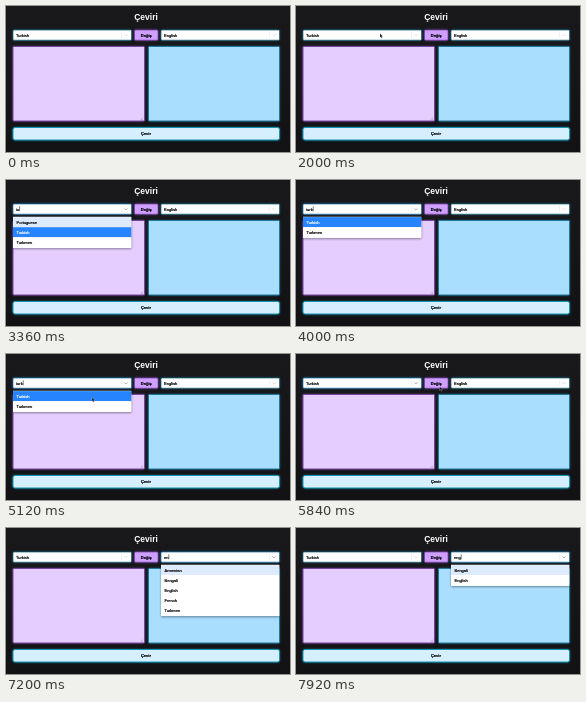
Write an HTML page that moves like this. It is 284 px wide and 146 px high and loops after 8 s.

```html
<!DOCTYPE html>
<html lang="tr">
<head>
<meta charset="utf-8">
<title>Çeviri</title>
<style>
  html, body { margin: 0; width: 100%; height: 100%; overflow: hidden; background: #17171a; }
  svg { display: block; }
  body > svg { width: 100vw; height: 100vh; }
  text { font: 4px "Liberation Sans", Arial, sans-serif; fill: #000; stroke: #000; stroke-width: .2; }
  .light { fill: #fff; stroke: #fff; }
  .bold { font-weight: 700; text-anchor: middle; }
  .title { font-size: 8.5px; stroke: none; }
</style>
</head>
<body>
<svg viewBox="0 0 284 146">
  <defs>
    <linearGradient id="page" x2="0" y2="1">
      <stop stop-color="#19191c"/><stop offset="1" stop-color="#121215"/>
    </linearGradient>
    <filter id="glow" x="-20%" y="-50%" width="140%" height="200%"><feGaussianBlur stdDeviation="1"/></filter>
  </defs>
  <rect width="284" height="146" fill="url(#page)"/>
  <text class="bold light title" x="140" y="14">Çeviri</text>
  <g id="panels"></g>
  <text class="bold" x="140.3" y="30.7">Değiş</text>
  <text class="bold" x="140" y="129.2">Çevir</text>
  <path d="M134.5 114l2.5-2.5M136 114l1-1" stroke="#8874a0" stroke-width=".4"/>
  <g id="live"></g>
</svg>
<script>
const LOOP = 8000;
const BLINK = 540;
const ROW = 10.1;
const WIDTH = 118.5;
const LANGUAGES = ('Afrikaans Albanian Amharic Arabic Armenian Azerbaijani Basque Belarusian Bengali ' +
  'Bosnian Bulgarian Catalan Cebuano Croatian Czech Danish Dutch English Esperanto Estonian ' +
  'Finnish French Galician Georgian German Greek Gujarati Hindi Italian Japanese Latin ' +
  'Lithuanian Portuguese Russian Turkish Turkmen Vietnamese').split(' ');

const selects = [
  { x: 7, value: 'Turkish', selected: 'Turkish', focus: [2080, 6080], open: [2160, 5360],
    keys: [[2960, 't'], [3280, 'tu'], [3520, 'tur'], [3680, 'turk']] },
  { x: 155, value: 'English', selected: '', focus: [6080, LOOP], open: [6140, LOOP],
    keys: [[6640, 'e'], [6960, 'en'], [7440, 'eng']] },
];

// Pointer stops: time, x, y
const pointerPath = [
  [320, 141, 123], [640, 151, 62], [800, 140, 18], [1040, 84, 28], [1440, 84, 28], [1520, 84, 27.5],
  [2160, 84, 27.5], [2400, 82.5, 28], [4480, 82.5, 28], [4960, 86, 43.5],
  [5600, 86, 43.5], [6000, 174.5, 26.5], [LOOP, 174.5, 26.5],
];
const pointerShown = [[320, 2960], [4480, 6640]];

const within = (t, [from, to]) => t >= from && t < to;
const ease = p => p * p * (3 - 2 * p);

const rect = (x, y, w, h, fill, extra = '') =>
  `<rect x="${x}" y="${y}" width="${w}" height="${h}" fill="${fill}" ${extra}/>`;
const label = (x, y, text, style = '') => `<text x="${x}" y="${y}" class="${style}">${text}</text>`;

function panel(x, y, w, h, fill, border, { radius = 1, line = 1 } = {}) {
  return rect(x, y, w, h, border, `rx="${radius}" stroke="${border}" filter="url(#glow)" opacity=".6"`) +
    rect(x, y, w, h, fill, `rx="${radius}" stroke="${border}" stroke-width="${line}"`);
}

const pen = document.createElement('canvas').getContext('2d');
pen.font = '40px "Liberation Sans", Arial, sans-serif';
const measure = text => pen.measureText(text).width / 10;

// Latest typed text and the time of the last action
function typing({ keys, open }, t) {
  return keys.filter(([at]) => t >= at).pop() || [open[0], ''];
}

function menu({ x, selected }, query) {
  const options = LANGUAGES.filter(name => name.toLowerCase().includes(query));
  const height = Math.min(76, options.length * ROW + 1.2);
  const rows = options.slice(0, 8).map((name, i) => {
    const top = .6 + i * ROW;
    const chosen = query && name === selected;
    const fill = chosen ? '#2684ff' : i === 0 ? '#deebff' : '#fff';
    return rect(0, top, WIDTH, ROW, fill) + label(3.5, top + 6.5, name, chosen ? 'light' : '');
  }).join('');
  const scrollbar = options.length < 8 ? '' :
    rect(115.5, 0, 3, height, '#fafafa') + rect(116.3, .8, 1.3, 5, '#999', 'rx=".6"');
  return rect(x, 37, WIDTH, height + .5, '#000', 'rx="1" filter="url(#glow)" opacity=".4"') +
    `<svg x="${x}" y="36.5" width="${WIDTH}" height="${height}">` +
    rect(0, 0, WIDTH, height, '#fff') + rows + scrollbar + '</svg>';
}

function drawSelect(select, t) {
  const { x, value } = select;
  const focused = within(t, select.focus);
  const opened = within(t, select.open);
  const [lastKey, query] = opened ? typing(select, t) : [0, ''];
  const caret = opened && (t - lastKey) % (2 * BLINK) < BLINK;
  return panel(x, 24, WIDTH, 10.2, '#fff', focused ? '#1c6c9c' : '#176078', { line: .7 }) +
    label(x + 3, 30.5, query || value) +
    `<path d="M${x + 108.5} 26v6" stroke="#ddd" stroke-width=".4"/>` +
    `<path d="M${x + 111.5} 28.4l1.5 1.5 1.5-1.5" fill="none" stroke="${focused ? '#777' : '#ccc'}" stroke-width=".6"/>` +
    (caret ? rect(x + 3.2 + measure(query), 26.3, .5, 5, '#000') : '') +
    (opened ? menu(select, query) : '');
}

function pointer(t) {
  if (!pointerShown.some(span => within(t, span))) return '';
  const next = pointerPath.findIndex(([at]) => at > t);
  const [t0, x0, y0] = pointerPath[next - 1];
  const [t1, x1, y1] = pointerPath[next];
  const p = ease((t - t0) / (t1 - t0));
  return `<path transform="translate(${x0 + (x1 - x0) * p} ${y0 + (y1 - y0) * p})"
    d="M0 0v4.1l.95-.85.65 1.5.7-.3-.65-1.45h1.25z" fill="#000" stroke="#fff" stroke-width=".25"/>`;
}

document.getElementById('panels').innerHTML =
  panel(128.5, 24, 23.5, 10.2, '#cf9fff', '#70409f', { line: .7 }) +
  panel(7, 40.5, 131.5, 74.5, '#e5cdff', '#74459c') +
  panel(142.5, 40.5, 131, 74.5, '#aadeff', '#207799') +
  panel(7, 121.5, 266.5, 12.5, '#d6efff', '#1793b0', { radius: 2 });

const live = document.getElementById('live');
function render(t) {
  live.innerHTML = selects.map(select => drawSelect(select, t)).join('') + pointer(t);
}

const start = performance.now();
function tick() {
  render((performance.now() - start) % LOOP);
  requestAnimationFrame(tick);
}
render(0);
requestAnimationFrame(tick);
</script>
</body>
</html>
```
